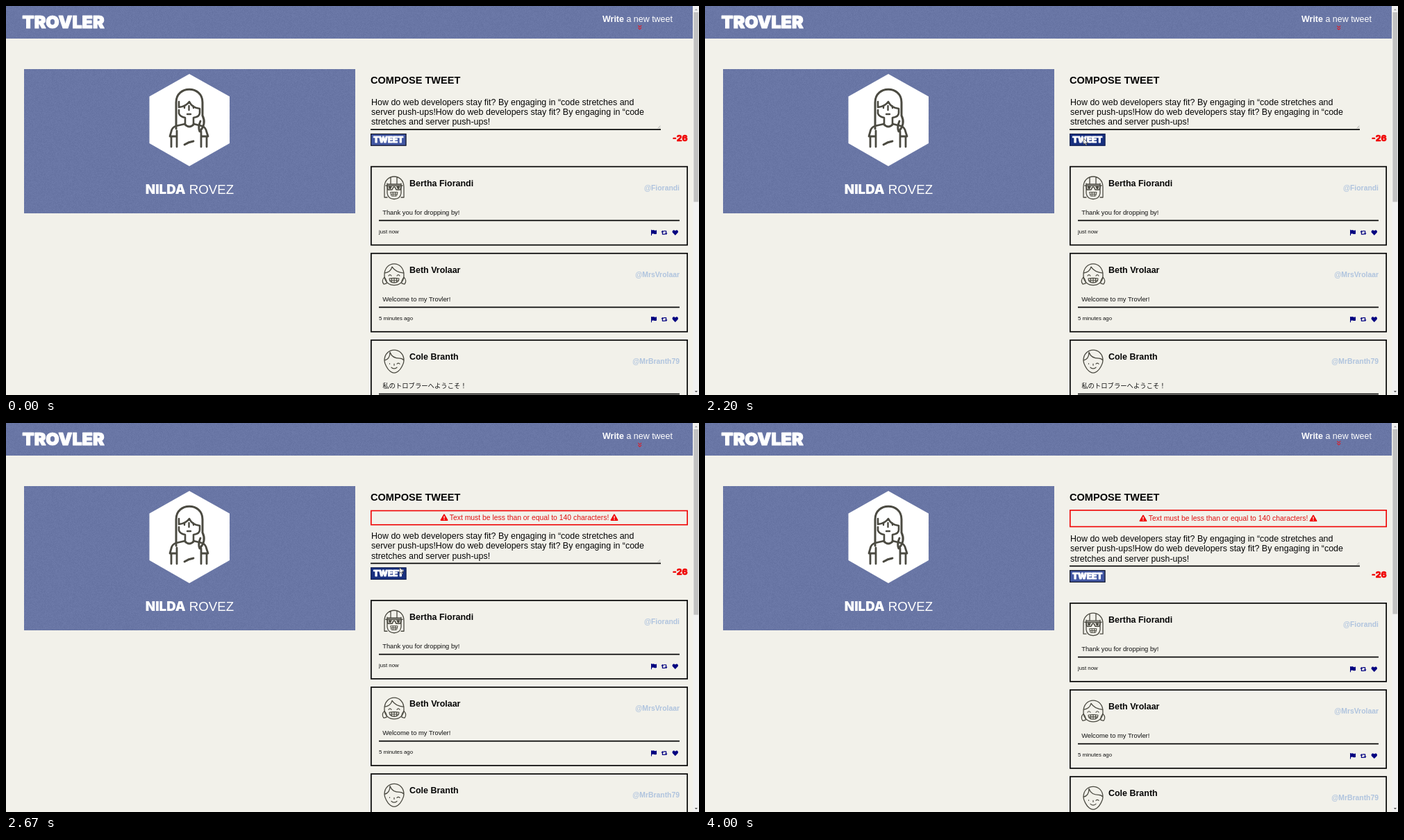
An HTML page with a canvas for the animation above (4070 ms loop, 998 by 561 pixels).

```html
<!DOCTYPE html>
<html lang="en">
<head>
<meta charset="utf-8">
<title>Trovler</title>
<style>
html, body { margin: 0; width: 100%; height: 100%; overflow: hidden; background: #f2f1ea; }
canvas { display: block; width: 998px; height: 561px; }
</style>
</head>
<body>
<canvas id="stage" width="998" height="561"></canvas>
<script>
const ctx = document.getElementById('stage').getContext('2d');
const LOOP = 4070, STEP = 1000 / 15;
const PAPER = '#f2f1ea', NAVY = '#000080', INK = '#4b4a41', RED = '#f00000', BLACK = '#050505';
const SANS = '"Liberation Sans", Arial, sans-serif';
const HEAVY = 'Inter, "Liberation Sans", sans-serif';
const CJK = '"Noto Sans CJK JP", "Noto Sans CJK", sans-serif';

const POST = [
  'How do web developers stay fit? By engaging in “code stretches and',
  'server push-ups!How do web developers stay fit? By engaging in “code',
  'stretches and server push-ups!'
];

const CARDS = [
  { name: 'Bertha Fiorandi', handle: '@Fiorandi', body: 'Thank you for dropping by!', age: 'just now', face: glassesFace },
  { name: 'Beth Vrolaar', handle: '@MrsVrolaar', body: 'Welcome to my Trovler!', age: '5 minutes ago', face: pigtailFace },
  { name: 'Cole Branth', handle: '@MrBranth79', body: '私のトロブラーへようこそ！', age: '', face: boyFace, font: CJK }
];

// Pointer tip: time, x, y
const PATH = [
  [1260, 640, 316], [1400, 590, 268], [1600, 556, 219], [1760, 550, 203], [1930, 546, 192],
  [2380, 545, 191], [2600, 546, 191], [2740, 590, 228], [2870, 646, 271], [3000, 625, 296],
  [3130, 520, 310], [3270, 400, 335], [3470, 300, 345]
];

function text(s, x, y, size, color, o = {}) {
  ctx.font = `${o.weight || 400} ${size}px ${o.font || SANS}`;
  ctx.textAlign = o.align || 'left';
  ctx.fillStyle = color;
  ctx.fillText(s, x, y);
  if (o.fat) {
    ctx.lineWidth = o.fat;
    ctx.lineJoin = 'round';
    ctx.strokeStyle = color;
    ctx.strokeText(s, x, y);
  }
  return ctx.measureText(s).width;
}

function rect(x, y, w, h, color) {
  ctx.fillStyle = color;
  ctx.fillRect(x, y, w, h);
}

function frame(x, y, w, h, line, color) {
  ctx.strokeStyle = color;
  ctx.lineWidth = line;
  ctx.lineJoin = 'miter';
  ctx.strokeRect(x + line / 2, y + line / 2, w - line, h - line);
}

function fill(d, color) {
  ctx.fillStyle = color;
  ctx.fill(new Path2D(d));
}

function draw(d, width, color = INK) {
  ctx.strokeStyle = color;
  ctx.lineWidth = width;
  ctx.lineCap = ctx.lineJoin = 'round';
  ctx.stroke(new Path2D(d));
}

function at(x, y, paint) {
  ctx.save();
  ctx.translate(x, y);
  paint();
  ctx.restore();
}

// Softly grained blue paper
const grain = document.createElement('canvas');
grain.width = 989;
grain.height = 300;
(function () {
  const g = grain.getContext('2d');
  const img = g.createImageData(989, 300);
  let seed = 7;
  for (let i = 0; i < img.data.length; i += 4) {
    seed = (seed * 1664525 + 1013904223) >>> 0;
    const n = (seed / 4294967296 - 0.5) * 9;
    img.data[i] = 105 + n;
    img.data[i + 1] = 118 + n;
    img.data[i + 2] = 165 + n;
    img.data[i + 3] = 255;
  }
  g.putImageData(img, 0, 0);
})();

function paper(x, y, w, h) {
  ctx.drawImage(grain, 0, 0, w, h, x, y, w, h);
}

function glassesFace() {
  draw('M-14 14V-1C-14 -21 14 -21 14 -1V14H10M-14 14H-10M-10 -6V8Q-9 16 0 16.5Q9 16 10 8V-6M-10 -5H10M-5 -5V-15M4 -5V-15', 1.3);
  draw('M-12 -3H12M-10 -2L-9 3H-3L-1 -1L1 -1L3 3H9L10 -2', 1.6);
  fill('M-8.5 -2H-3L-5 2H-7ZM3 -2H8.5L7 2H5Z', INK);
  draw('M-5 6.5H5L3.5 12H-3.5ZM-4.5 9.2H4.5M-1.7 6.5V12M1.7 6.5V12', 1);
}

function pigtailFace() {
  draw('M-14 2C-15 -21 15 -21 14 2C14 20 -14 20 -14 2M-14 -2Q-5 -3 -3 -11Q2 -3 14 -2', 1.3);
  draw('M-14 4Q-19 9 -15 14L-11 13Q-10 9 -14 4M14 4Q19 9 15 14L11 13Q10 9 14 4', 1.2);
  draw('M-8 2Q-6 -1 -4 2M4 2Q6 -1 8 2M-7 6Q0 4.5 7 6Q7 12 0 12Q-7 12 -7 6M-6.5 8.6H6.5M-3.5 6V11M0 5.5V12M3.5 6V11', 1.1);
}

function boyFace() {
  draw('M-14 -1C-14 -21 14 -21 14 -1M-14 -1C-14 3 -12 6 -11 8C-8 14 -3 17 0 17C3 17 8 14 11 8C12 6 14 3 14 -1M-14 -1Q-6 -3 -6 -13Q-3 -4 8 -4Q12 -4 14 -1', 1.3);
  draw('M-6.5 3.5V4M4 4Q6 2 8 4M-4 9Q0 12.5 4 9M0 4V6', 1.2);
}

function portrait() {
  draw('M245 177V139C245 114 283 114 283 139V158C286 164 287 172 279 181Q276 175 280 166', 3);
  draw('M249 150V155Q251 160 258 161V169M270 169V161Q279 160 279 154V148Q268 147 264 138Q259 145 249 146V138', 2.6);
  draw('M257 144.5V147M270 144.5V147M263.5 144V150M261 156H266', 2.4);
  draw('M258 170L245 173Q239 175 238 181L236 188H246M246 180V203M238 189V203M270 170L282 173Q288 175 289 182L291 188H281M281 181V203M289 189V203M257 170Q264 178 271 170M257 200Q263 196 270 195', 2.8);
}

function profile() {
  paper(26, 91, 476.5, 207.5);
  fill('M264 98L322 130.5V198L264 231L206.5 198V130.5Z', '#fff');
  portrait();
  const first = 'NILDA', last = ' ROVEZ', size = 18.7;
  ctx.font = `900 ${size}px ${HEAVY}`;
  const a = ctx.measureText(first).width;
  ctx.font = `${size}px ${SANS}`;
  const x = 264.5 - (a + ctx.measureText(last).width) / 2;
  text(first, x, 271, size, '#fff', { weight: 900, font: HEAVY });
  text(last, x + a, 271, size, '#fff');
}

function header(t) {
  paper(0, 0, 989, 46.7);
  text('TROVLER', 23.5, 32, 25, '#fff', { weight: 900, font: HEAVY, fat: 1.2 });
  const w = text('Write', 859, 22.8, 12.475, '#fff', { weight: 700 });
  text(' a new tweet', 859 + w, 22.8, 12.475, '#fff');
  const y = 30.3 + 1.4 * Math.cos((t - 2450) / 1500 * Math.PI);
  at(912.7, y, () => draw('M-2.2 -2.6L0 -.5L2.2 -2.6M-2.2 .6L0 2.7L2.2 .6', 1.1, '#d8202c'));
}

function warning(x, y) {
  at(x, y, () => {
    fill('M-.8 -4.4Q0 -5.4 .8 -4.4L5.4 3.6Q5.7 4.6 4.7 4.7H-4.7Q-5.7 4.6 -5.4 3.6Z', RED);
    rect(-0.7, -2, 1.4, 3.4, PAPER);
    rect(-0.7, 2.2, 1.4, 1.4, PAPER);
  });
}

function alertBox(p) {
  const top = 129.5 - 4.5 * p, h = 3 + 22.3 * p, mid = top + 1.1 + 11.2 * p;
  ctx.save();
  ctx.beginPath();
  ctx.rect(525, top, 457, h);
  ctx.clip();
  warning(631, mid);
  warning(876, mid);
  text('Text must be less than or equal to 140 characters!', 753.5, mid + 3.7, 10.38, '#e01212', { align: 'center' });
  ctx.restore();
  frame(525, top, 457, h, 1.6, RED);
}

function composer(dark) {
  POST.forEach((line, i) => text(line, 526, 142.6 + i * 14.35, 12.475, BLACK));
  rect(525, 177.3, 418, 1.7, BLACK);
  draw('M939 176L942 173M941 176.2L942.2 175', 0.6, '#888');
  rect(525, 184, 51.5, 17.7, dark ? '#183080' : '#4257a3');
  frame(525, 184, 51.5, 17.7, 1.1, dark ? '#15224f' : '#10131f');
  text('TWEET', 550.7, 197, 11.8, '#fff', { weight: 900, font: HEAVY, align: 'center', fat: 0.9 });
  text('-26', 981.5, 195.2, 12, RED, { weight: 900, font: HEAVY, align: 'right', fat: 0.5 });
}

function icons(y) {
  at(933, y, () => fill('M-4 -4H-3V-3.4Q-1 -4.4 1 -3.3Q2.5 -2.8 4 -3.6V1.7Q2 2.7 0 1.7Q-1.5 1.2 -3 1.9V4.3H-4Z', NAVY));
  at(948, y, () => {
    draw('M-2.6 -1.5V2.3H1M2.6 1.5V-2.3H-1', 1.2, NAVY);
    fill('M-4.6 -.6L-2.6 -3.2L-.6 -.6ZM4.6 .6L2.6 3.2L.6 .6Z', NAVY);
  });
  at(963.8, y, () => fill('M0 4L-3.6 .3C-5.6 -2.4 -2 -5.2 0 -2.5C2 -5.2 5.6 -2.4 3.6 .3Z', NAVY));
}

function card(c, y, lifted) {
  if (lifted) rect(530, y + 5, 457, 114.7, '#c3c2bd');
  rect(525, y, 457, 114.7, PAPER);
  frame(525, y, 457, 114.7, 1.7, BLACK);
  at(559, y + 31.2, c.face);
  text(c.name, 581, y + 29, 12.475, BLACK, { weight: 700 });
  text(c.handle, 970, y + 35.2, 10.4, '#b0c4de', { weight: 700, align: 'right' });
  text(c.body, 542.2, y + 70, 9.356, '#111', { font: c.font });
  rect(537, y + 77.7, 433, 1.7, BLACK);
  text(c.age, 537, y + 97, 7.8, '#111');
  icons(y + 96);
}

function scrollbar(p) {
  rect(989.5, 0, 8.5, 561, '#f1f1f1');
  rect(990.4, 9, 6.8, 273.5 - 7 * p, '#c1c1c1');
  fill('M991.8 6.2L993.9 4L996 6.2Z', '#a3a3a3');
  fill('M991.8 555L993.9 557.3L996 555Z', '#505050');
}

function pointer(t) {
  const last = PATH.length - 1;
  if (t < PATH[0][0] || t > PATH[last][0]) return;
  let i = 0;
  while (i < last - 1 && PATH[i + 1][0] < t) i++;
  const [t0, x0, y0] = PATH[i], [t1, x1, y1] = PATH[i + 1];
  const k = (t - t0) / (t1 - t0);
  at(x0 + (x1 - x0) * k, y0 + (y1 - y0) * k, () => {
    if (t > 2450 && t < 2600) {
      draw('M-1.2 -4H1.2M0 -4V4M-1.2 4H1.2', 0.9, '#666');
    } else {
      const arrow = 'M0 0V8.2L1.9 6.5L3.3 9.6L4.6 9L3.2 6H5.7Z';
      fill(arrow, '#fff');
      draw(arrow, 0.7, '#333');
    }
  });
}

function render(t) {
  const u = Math.min(1, Math.max(0, (t - 2370) / 400));
  const p = 0.5 - Math.cos(u * Math.PI) / 2;
  const shift = u > 0 ? 3 + 25.2 * p : 0;
  const lifted = (t > 1290 && t < 1640) || (t > 2910 && t < 3150);
  rect(0, 0, 998, 561, PAPER);
  header(t);
  profile();
  text('COMPOSE TWEET', 525, 111.8, 14.55, BLACK, { weight: 700 });
  if (u > 0) alertBox(p);
  at(0, shift, () => {
    composer(t > 1880 && t < 3400);
    CARDS.forEach((c, i) => card(c, 230.8 + i * 125.1, i === 0 && lifted));
  });
  scrollbar(p);
  pointer(t);
}

const start = performance.now();
function tick() {
  const t = (performance.now() - start) % LOOP;
  render(Math.floor((t + 5) / STEP) * STEP);
  requestAnimationFrame(tick);
}
tick();
</script>
</body>
</html>
```
